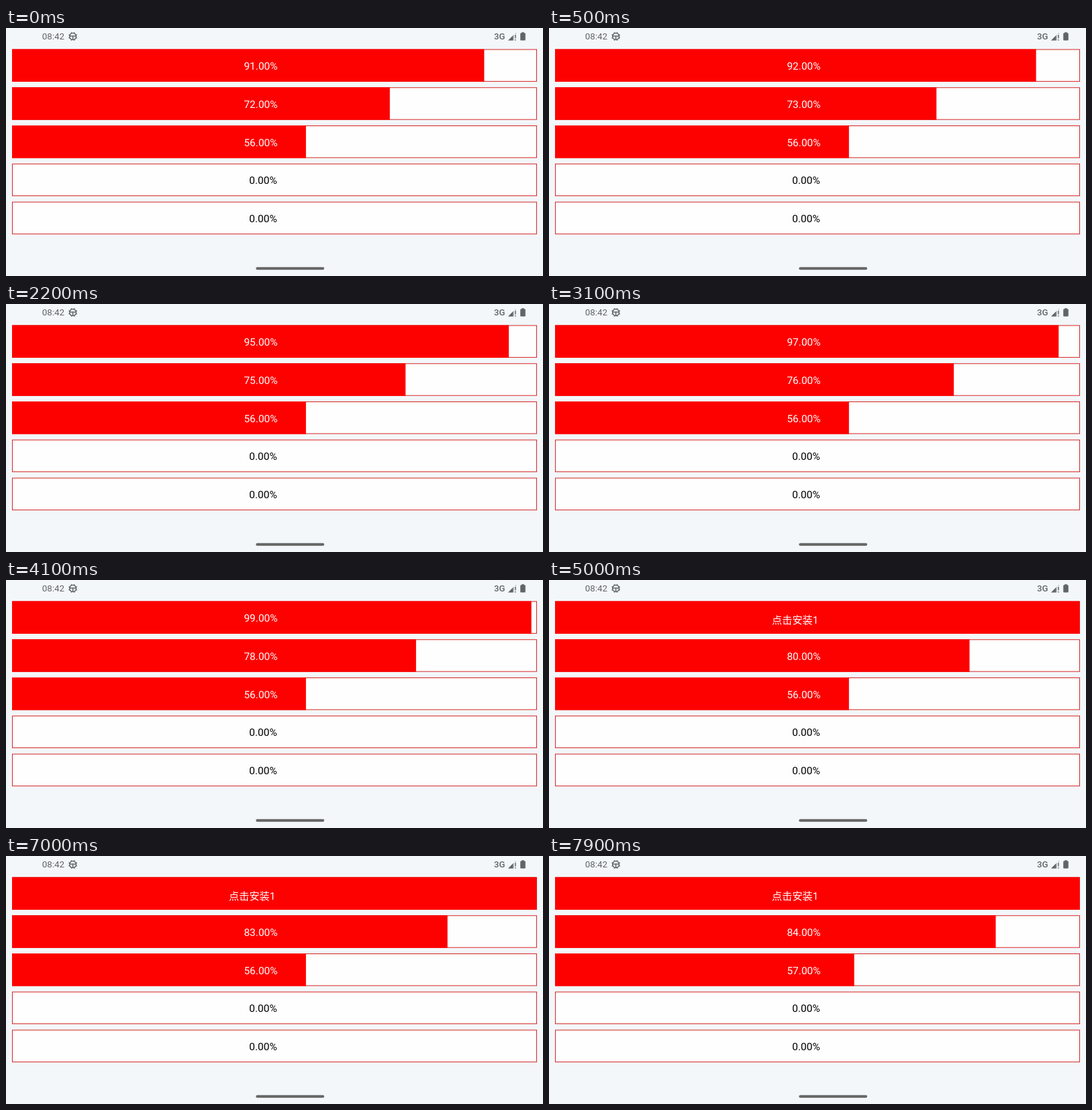
These frames come from a looping animation (800 px wide and 369 px high, 8 s). An HTML page with a canvas:

```html
<!DOCTYPE html>
<html lang="zh">
<head>
<meta charset="utf-8">
<style>
  html, body { margin: 0; width: 100%; height: 100%; overflow: hidden; background: #f3f7fa; }
  canvas { display: block; }
</style>
</head>
<body>
<canvas id="stage" width="800" height="369"></canvas>
<script>
const ctx = document.getElementById('stage').getContext('2d');
const LOOP = 8000, STEP = 100, GLIDE = 160;
const LEFT = 9.5, WIDTH = 781, TOP = 32, HEIGHT = 47.4, PITCH = 56.75;
const FONT = 'Roboto, "Noto Sans CJK SC", "Noto Sans CJK", sans-serif';
const BACKGROUND = '#f3f7fa', GREY = '#626567', RED = '#fd0000', BORDER = '#d62424';

// A download gains one point at each key time and one halfway to the next key.
const downloads = [
  { start: 90, keys: [0, 800, 2100, 3100, 3800, 5800] },
  { start: 71, keys: [-300, 1100, 2800, 4100, 5000, 6100, 7300] },
  { start: 56, keys: [7600] },
  { start: 0, keys: [] },
  { start: 0, keys: [] }
];

const ease = p => (1 - Math.cos(Math.PI * p)) / 2;

// The label jumps at once; the fill level glides after it.
function progress({ start, keys }, t) {
  const ticks = keys.flatMap((key, i) => i + 1 < keys.length ? [key, (key + keys[i + 1]) / 2] : [key]);
  const passed = ticks.filter(tick => tick <= t);
  const level = passed.reduce((sum, tick) => sum + ease(Math.min(1, (t - tick) / GLIDE)), start);
  return { label: Math.min(100, start + passed.length), level: Math.min(100, level) };
}

function text(str, x, y, size, color, weight = 400) {
  ctx.font = `${weight} ${size}px ${FONT}`;
  ctx.fillStyle = color;
  ctx.fillText(str, x, y);
}

function box(x, y, w, h, color, radius = 0) {
  ctx.fillStyle = color;
  ctx.beginPath();
  ctx.roundRect(x, y, w, h, radius);
  ctx.fill();
}

function triangle(x, y, size, color) {
  ctx.fillStyle = color;
  ctx.beginPath();
  ctx.moveTo(x, y);
  ctx.lineTo(x + size, y - size);
  ctx.lineTo(x + size, y);
  ctx.fill();
}

function drawBar(download, row, t) {
  const { label, level } = progress(download, t);
  const offset = row * PITCH, top = TOP + offset;
  box(LEFT, top, WIDTH, HEIGHT, '#fefefe');
  ctx.lineWidth = 1;
  ctx.strokeStyle = BORDER;
  ctx.strokeRect(LEFT, top, WIDTH, HEIGHT);
  if (level > 0) box(LEFT - 0.5, top - 0.5, WIDTH * level / 100 + 0.5, HEIGHT + 1, RED);

  if (label === 100) text('点击安装' + (row + 1), 332, 65.4 + offset, 15.2, '#fff');
  else text(label.toFixed(2) + '%', label ? 354.4 : 362.3, 62.2 + offset, 15.5, label ? '#fff' : '#000');
}

function drawWheel(x, y) {
  ctx.strokeStyle = GREY;
  ctx.lineWidth = 1.5;
  ctx.beginPath();
  ctx.arc(x, y, 5, 0, 2 * Math.PI);
  ctx.moveTo(x - 4.5, y - 0.4);
  ctx.lineTo(x + 4.5, y - 0.4);
  ctx.moveTo(x, y);
  ctx.lineTo(x, y + 4.5);
  for (let i = 0; i < 8; i++) {
    const angle = (i + 0.5) * Math.PI / 4, c = Math.cos(angle), s = Math.sin(angle);
    ctx.moveTo(x + 5 * c, y + 5 * s);
    ctx.lineTo(x + 6.6 * c, y + 6.6 * s);
  }
  ctx.stroke();
}

function drawSystem() {
  text('08:42', 53.8, 17, 13.4, GREY);
  drawWheel(99.6, 12.5);
  text('3G', 727, 17, 13.2, GREY, 500);

  // Weak signal with an alert mark
  triangle(748, 18.5, 12, '#c3c7ca');
  triangle(748, 18.5, 7.5, GREY);
  box(757, 9, 3.5, 10, BACKGROUND);
  box(758.2, 10, 1.5, 5.5, GREY);
  box(758.2, 17, 1.5, 1.5, GREY);

  // Battery and navigation handle
  box(768.2, 6.3, 3.6, 2, GREY);
  box(766.2, 7.5, 7.6, 11, GREY, 1);
  box(372.3, 355.7, 101.8, 4, '#666', 2);
}

function draw(now) {
  const t = Math.floor((now % LOOP) / STEP) * STEP;
  box(0, 0, 800, 369, BACKGROUND);
  drawSystem();
  downloads.forEach((download, row) => drawBar(download, row, t));
  requestAnimationFrame(draw);
}
draw(0);
</script>
</body>
</html>
```
